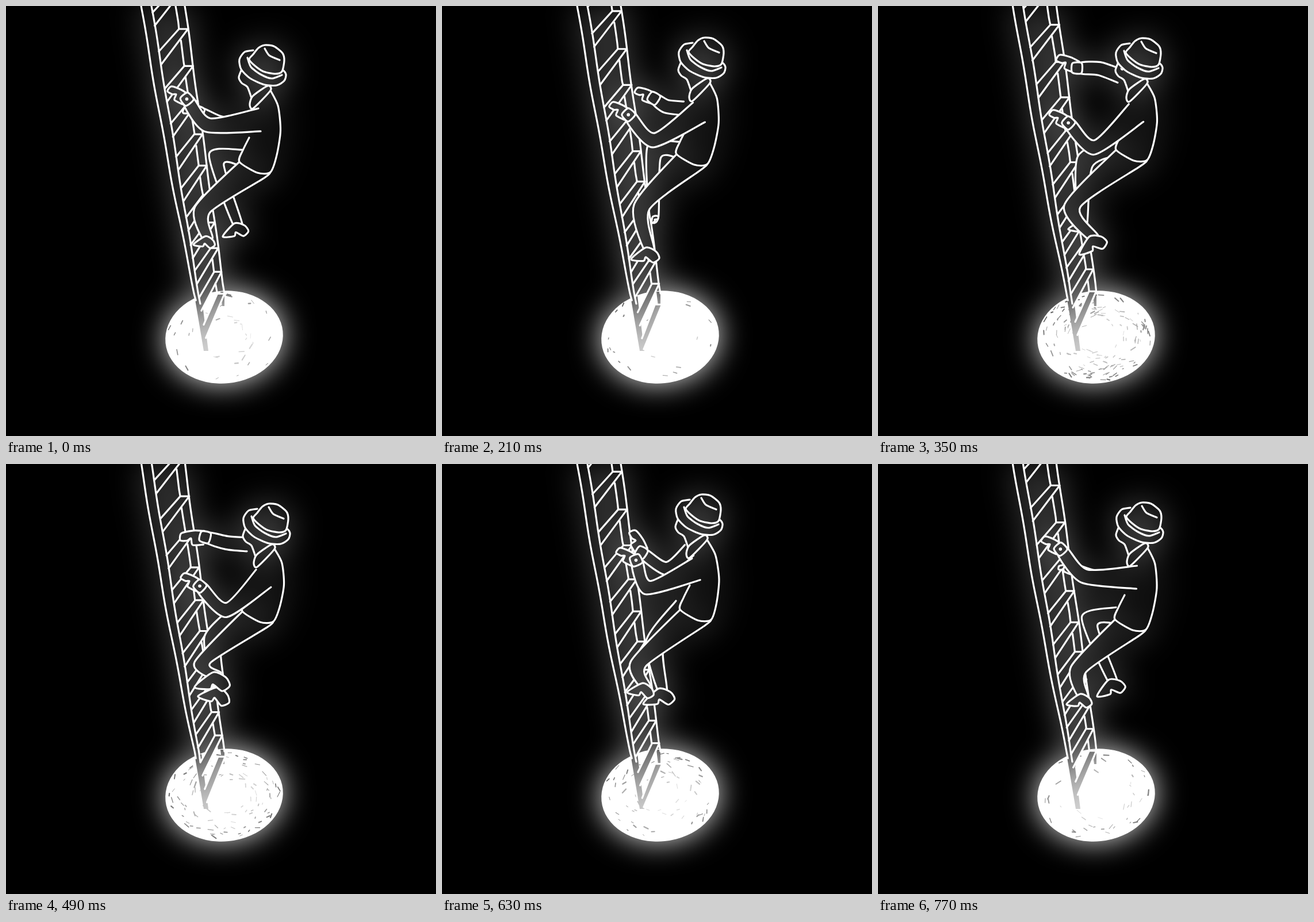
An HTML page with a canvas for the animation above (840 ms loop, 748 by 748 pixels).

```html
<!DOCTYPE html>
<html lang="en">
<head>
<meta charset="utf-8">
<title>Climber</title>
<style>
  html, body { margin: 0; width: 100%; height: 100%; overflow: hidden; background: #000; }
  canvas { display: block; width: 748px; height: 748px; }
</style>
</head>
<body>
<canvas id="stage" width="748" height="748"></canvas>
<script>
const SIZE = 748, STEP = 70, STEPS = 12, LINE = 3.2;

// Joints of the climber at the key steps; everything else about him is derived.
// head and hip: one point. armF: elbow, wrist. armB: shoulder, elbow, wrist, fingertip.
// legF and legB: knee, ankle, toe.
const POSES = {
  0: { head: '0,0', hip: '460,289', armF: '351,207 317,165', armB: '418,197 376,204 338,186 308,184',
       legF: '342,354 351,405 326,415', legB: '366,267 404,382 377,401' },
  2: { head: '7,-5', hip: '456,284', armF: '360,229 320,185', armB: '410,216 395,208 372,195 340,189',
       legF: '348,354 356,426 326,435', legB: '375,246 371,362 365,370' },
  4: { head: '5,-21', hip: '467,266', armF: '376,238 334,199', armB: '428,140 385,141 371,130 332,108',
       legF: '347,345 366,425 332,446', legB: '363,262 367,372 364,386' },
  5: { head: '8,-12', hip: '468,268', armF: '376,246 334,206', armB: '421,122 385,109 350,108 311,92',
       legF: '338,348 376,404 350,432', legB: '360,271 356,380 331,388' },
  7: { head: '7,1', hip: '465,274', armF: '383,254 340,215', armB: '420,140 384,137 350,128 303,130',
       legF: '342,345 368,369 328,388', legB: '360,305 373,396 334,404' },
  9: { head: '1,-15', hip: '468,271', armF: '358,215 339,171', armB: '430,150 391,182 350,156 328,118',
       legF: '342,347 354,387 322,397', legB: '370,312 384,396 350,417' },
  11: { head: '9,-1', hip: '466,288', armF: '359,195 320,151', armB: '425,196 375,196 337,182 314,182',
        legF: '349,357 357,405 328,418', legB: '368,274 409,379 381,404' }
};

// Head and collar keep their shape and only travel.
const FACE = readPoints('410,110 405,124 410,134 420,141 427,160');
const BRIM = readPoints('430,77 415,80 406,93 409,110 425,126 450,137 471,138 484,130 487,119 480,110 440,85');
const CROWN = readPoints('423,93 430,84 439,73 450,68 466,70 481,82 484,95 480,114 468,118 448,114 433,104');
const BAND = readPoints('420,90 426,106 443,119 462,126 480,120');
const CREASE = readPoints('450,74 458,86 476,94');
const COLLAR = readPoints('424,172 429,157 455,139 460,147 430,178');

const add = (p, q, k = 1) => [p[0] + q[0] * k, p[1] + q[1] * k];
const mix = (p, q, t = .5) => [p[0] + (q[0] - p[0]) * t, p[1] + (q[1] - p[1]) * t];
const unit = (p, q) => {
  const d = add(q, p, -1), len = Math.hypot(...d) || 1;
  return [d[0] / len, d[1] / len];
};
const across = d => [d[1], -d[0]];

function readPoints(text) {
  return text.split(' ').map(p => p.split(',').map(Number));
}

// Steps without a key pose fall halfway between their neighbours.
function poseAt(step) {
  const a = POSES[step] || POSES[step - 1], b = POSES[step] || POSES[step + 1];
  const pose = {};
  for (const part in a) {
    const q = readPoints(b[part]);
    pose[part] = readPoints(a[part]).map((p, i) => mix(p, q[i]));
  }
  return pose;
}

function seeded(seed) {
  return () => {
    seed = (seed * 16807) % 2147483647;
    return seed / 2147483647;
  };
}

function makeCanvas() {
  const c = document.createElement('canvas');
  c.width = c.height = SIZE;
  return c;
}

function erase(g, paint) {
  g.globalCompositeOperation = 'destination-out';
  paint();
  g.globalCompositeOperation = 'source-over';
}

function poly(g, pts) {
  g.beginPath();
  pts.forEach(p => g.lineTo(...p));
}

// Softly rounded line through the points.
function trace(g, pts, closed) {
  const n = pts.length;
  const at = i => closed ? pts[(i + n) % n] : pts[Math.max(0, Math.min(n - 1, i))];
  g.beginPath();
  g.moveTo(...pts[0]);
  for (let i = 0; i < (closed ? n : n - 1); i++) {
    const [a, b, c, d] = [at(i - 1), at(i), at(i + 1), at(i + 2)];
    g.bezierCurveTo(...add(b, add(c, a, -1), 1 / 8), ...add(c, add(d, b, -1), -1 / 8), ...c);
  }
  if (closed) g.closePath();
}

// A drawn shape hides what lies behind it.
function shape(g, pts, closed) {
  trace(g, pts, closed);
  erase(g, () => g.fill());
  g.stroke();
}

function drawDisc(g, step) {
  const rnd = seeded(917 + step * 7331), cx = 379.5, cy = 576;
  const specks = 150 * Math.exp(-((step + 7) % STEPS) / 5);
  g.beginPath();
  g.ellipse(cx, cy, 102.5, 80.5, -.1, 0, 7);
  g.fill();
  erase(g, () => {
    for (let i = 0; i < specks; i++) {
      const a = rnd() * Math.PI * 2, r = Math.sqrt(.1 + .83 * rnd());
      const p = [cx + 101 * r * Math.cos(a), cy + 79 * r * Math.sin(a)];
      const dir = Math.atan2(79 * Math.cos(a), -101 * Math.sin(a)) + (rnd() - .5) * 1.2;
      const half = [Math.cos(dir), Math.sin(dir)], len = 1 + rnd() * 4;
      g.lineWidth = .6 + rnd() * 1.7;
      poly(g, [add(p, half, -len), add(p, half, len)]);
      g.stroke();
    }
  });
}

// Edges of the two rails: x at height y.
const leftOut = y => 235 + .187 * y - 3.5 * Math.sin(Math.PI * y / 540);
const leftIn = y => 253 + .164 * y;
const rightIn = y => 295 + .145 * y;
const rightOut = y => 311 + .138 * y;

function drawLadder(g, step) {
  const wobble = y => Math.sin(y * .035 + step * 2.1) * .7;
  const rail = (x, from, to) => {
    const pts = [];
    for (let y = from; y < to; y += 18) pts.push([x(y) + wobble(y), y]);
    pts.push([x(to), to]);
    trace(g, pts);
    g.stroke();
  };
  // Rungs crowd together downwards and slide down at an even pace.
  const rungY = k => {
    const u = k + .178 * step;
    return 40 + 66 * u - 1.65 * u * u;
  };

  erase(g, () => {
    poly(g, [[328, 505], [340, 505], [352, 600], [344, 600]]);
    g.fill();
    poly(g, [[373, 497], [380, 497], [380, 522], [376, 522]]);
    g.fill();
  });
  g.lineWidth = LINE;
  for (let k = -4; rungY(k) < 528; k++) {
    const y = rungY(k);
    const top = y + 39 + Math.max(0, y - 440) * .25, low = Math.min(top + 23, 597);
    poly(g, [[leftIn(top), top], [rightIn(y), y], [rightOut(y), y], [leftIn(low), low]]);
    erase(g, () => g.fill());
    g.stroke();
    const next = Math.min(rungY(k + 1), 500);
    if (next > y + 20) rail(rightIn, y + 20, next);
  }
  rail(leftOut, -4, 512);
  rail(leftIn, -4, 518);
  rail(rightOut, -4, 500);
}

// Outline around a chain of joints, open at its first end.
function limb(joints, widths) {
  const side = sign => joints.map((p, i) => {
    const into = unit(joints[Math.max(0, i - 1)], p), out = unit(p, joints[i + 1] || p);
    const dir = unit([0, 0], add(into, out));
    return add(p, across(dir), sign * widths[i] / 2);
  });
  return [...side(1), ...side(-1).reverse()];
}

// Places [along, across] pairs in a frame at p.
const place = (p, dir, scale, pairs) =>
  pairs.map(([u, v]) => add(add(p, dir, u * scale), across(dir), v * scale));

function drawArm(g, [shoulder, elbow, wrist, tip], widths) {
  const dir = unit(elbow, wrist), reach = Math.hypot(...add(tip, wrist, -1));
  shape(g, limb([shoulder, elbow, wrist], widths));
  shape(g, place(wrist, unit(wrist, tip), reach,
    [[.1, -.25], [.5, -.28], [.95, -.2], [1, .06], [.75, .08], [.6, 0], [.55, .25], [.15, .25]]));
  shape(g, place(add(wrist, dir, 4), dir, 8, [[-1, -1.1], [1, -1], [1, 1], [-1, 1.1]]), true);
}

function drawLeg(g, [hip, knee, ankle, toe], widths, start = []) {
  shape(g, [...start, ...limb([hip, knee, ankle], widths)]);
  const size = Math.hypot(...add(toe, ankle, -1)) / 33;
  shape(g, place(ankle, unit(ankle, toe), size,
    [[3, -7], [33, 0], [16, 11], [10, 7], [3, 20], [-9, 18], [-9, 6]]), true);
}

function drawMan(g, { head, hip, armF, armB, legF, legB }) {
  const shift = head[0], back = hip[0];
  const neck = add([459, 145], shift), front = add(back, [-54, -18]);
  const wrist = armF[1];
  const spine = [[0, 0], [.2, 14], [.5, 18], [.8, 11], [1, 0]]
    .map(([t, bulge]) => add(mix(neck, back, t), [bulge, 0]));

  g.lineWidth = LINE;
  drawArm(g, armB, [24, 23, 18]);
  drawLeg(g, [add(front, [5, -6]), ...legB], [30, 31, 15]);
  drawLeg(g, [mix(back, front), ...legF], [50, 28, 17], [back]);
  shape(g, [...spine, add(mix(back, front), [4, 10]), front, add(front, [6, -20]), add(front, [17, -42])]);

  const moved = pts => pts.map(p => add(p, shift));
  shape(g, moved(FACE));
  drawArm(g, [add(neck, [-18, 53]), ...armF, add(wrist, [-35, -19])], [40, 25, 20]);
  g.beginPath();
  g.arc(...add(wrist, unit(armF[0], wrist), 4), 2.8, 0, 7);
  g.fill();
  shape(g, moved(COLLAR), true);
  shape(g, moved(BRIM));
  shape(g, moved(BAND));
  shape(g, moved(CROWN), true);
  trace(g, moved(CREASE));
  g.stroke();
}

function render(step) {
  const art = makeCanvas(), g = art.getContext('2d');
  g.fillStyle = g.strokeStyle = '#fff';
  g.lineCap = g.lineJoin = 'round';
  drawDisc(g, step);
  drawLadder(g, step);
  drawMan(g, poseAt(step));

  const out = makeCanvas(), o = out.getContext('2d');
  o.fillRect(0, 0, SIZE, SIZE);
  o.globalAlpha = .9;
  o.filter = 'blur(26px)';
  o.drawImage(art, 0, 0);
  o.globalAlpha = 1;
  o.filter = 'none';
  o.drawImage(art, 0, 0);
  return out;
}

const views = Array.from({ length: STEPS }, (_, i) => render(i));
const stage = document.getElementById('stage').getContext('2d');

function play() {
  stage.drawImage(views[Math.floor(performance.now() / STEP) % STEPS], 0, 0);
  requestAnimationFrame(play);
}
play();
</script>
</body>
</html>
```
